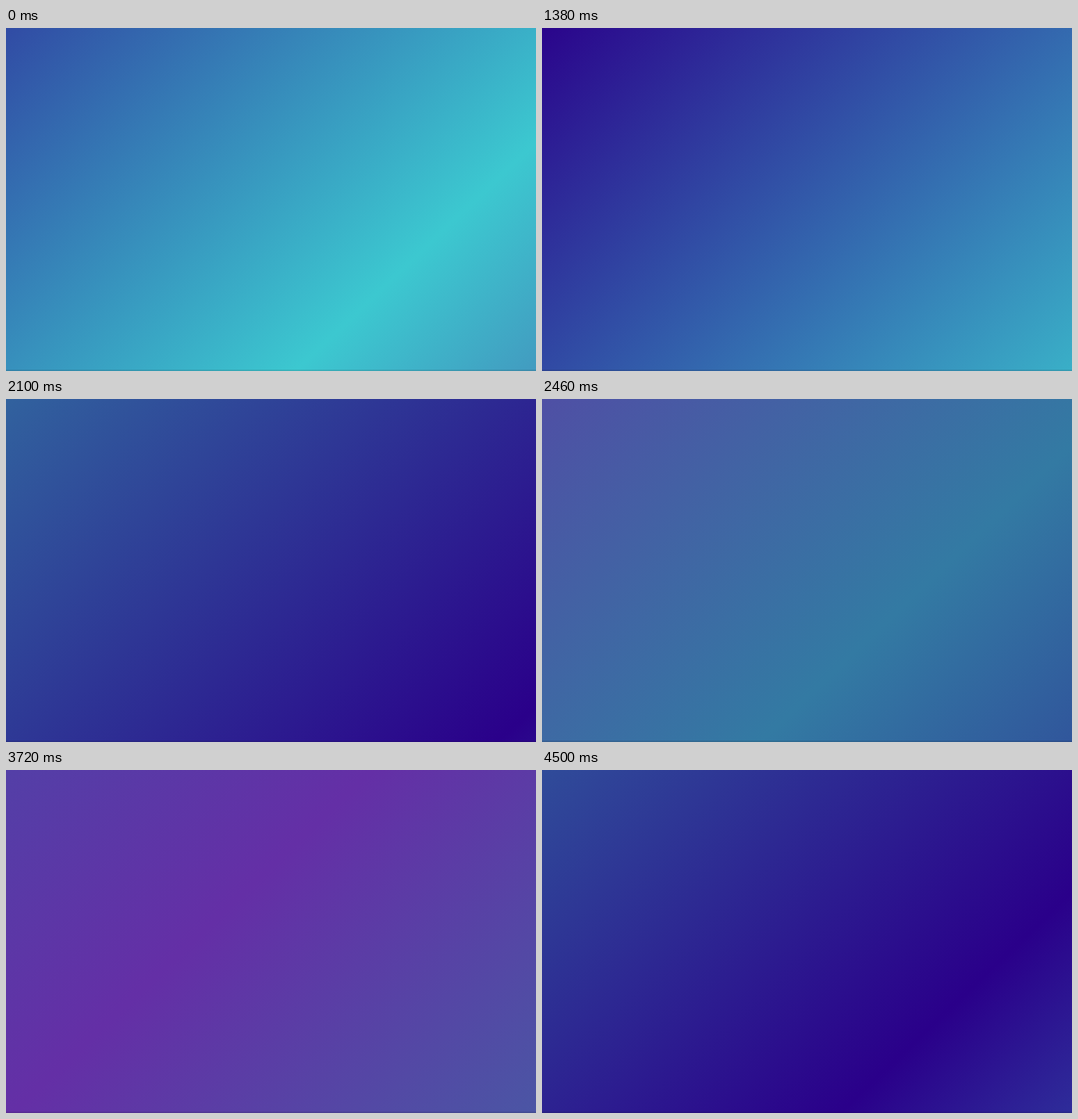
An HTML page with a canvas for the animation above (4530 ms loop, 762 px wide and 494 px high).

```html
<!DOCTYPE html>
<html>
<head>
<meta charset="utf-8">
<style>
  html, body { margin: 0; width: 100%; height: 100%; overflow: hidden; }
  canvas { display: block; }
</style>
</head>
<body>
<canvas id="stage" width="762" height="494"></canvas>
<script>
const W = 762, H = 494, LOOP = 4530, STEP = 30;
const SKEW = 1.0486;                 // lines of equal colour: x + SKEW * y = const
const LENGTH = 5 * (W + SKEW * H);   // the gradient is five stages long
const TRAVEL = LENGTH * 0.8;
const TURN = 3243, SWEEP = 3020;     // moment of reversal, duration of one sweep
const STOPS = [
  [0, '#335fa9'], [0.244, '#642fa6'], [0.473, '#337aa3'],
  [0.712, '#2a008a'], [0.946, '#3cc8d0'], [1, '#429bc0']
];
const ctx = document.getElementById('stage').getContext('2d');

// cubic-bezier(.25, .1, .25, 1), solved by bisection
function ease(x) {
  if (x >= 1) return 1;
  const bezier = (a, b, s) => 3 * a * s * (1 - s) ** 2 + 3 * b * s * s * (1 - s) + s ** 3;
  let low = 0, high = 1;
  for (let i = 0; i < 24; i++) {
    const mid = (low + high) / 2;
    if (bezier(0.25, 0.25, mid) < x) low = mid; else high = mid;
  }
  return bezier(0.1, 1, low);
}

// The picture rests at both ends of the sweep
function hold(t) {
  if (t < 990) return 0;
  if (t >= 2940 && t < 3630) return 2940;
  return Math.floor(t / STEP) * STEP;
}

function draw(t) {
  const shift = TRAVEL * ease(Math.abs(hold(t) - TURN) / SWEEP);
  const point = s => [s / (1 + SKEW ** 2), s * SKEW / (1 + SKEW ** 2)];
  const gradient = ctx.createLinearGradient(...point(-shift), ...point(LENGTH - shift));
  for (const [at, color] of STOPS) gradient.addColorStop(at, color);
  ctx.fillStyle = gradient;
  ctx.fillRect(0, 0, W, H);
  ctx.fillStyle = 'rgba(0, 0, 0, 0.1)';
  ctx.fillRect(0, H - 2, W, 2);
}

const start = performance.now();
function tick() {
  draw((performance.now() - start) % LOOP);
  requestAnimationFrame(tick);
}
tick();
</script>
</body>
</html>
```
